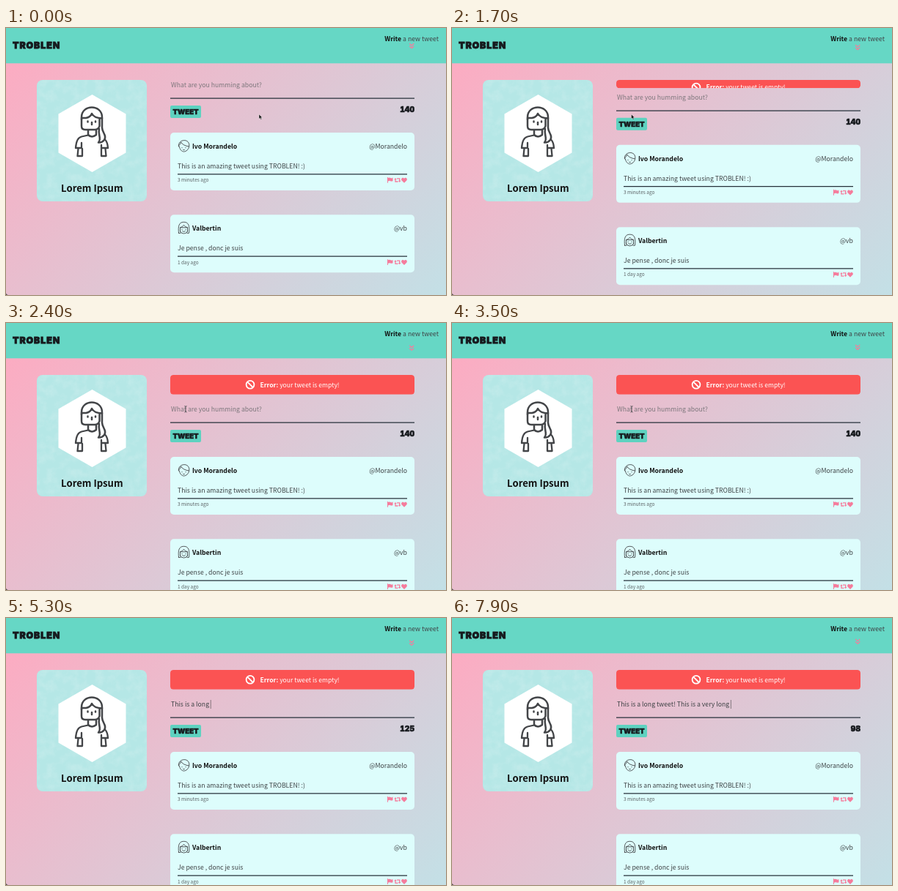
An HTML page for the animation above (8 s loop, 600x365 px).

```html
<!DOCTYPE html>
<html lang="en">
<head>
<meta charset="utf-8">
<title>Microblog</title>
<style>
  html, body { margin: 0; width: 100%; height: 100%; overflow: hidden; }
  body { background: linear-gradient(135deg, #ffa9c0, #c3e0e6); }
  svg { display: block; width: 600px; height: 365px; }
  text {
    font: 8.7px "Noto Sans CJK JP", "Noto Sans CJK SC", "Noto Sans CJK", "Open Sans", sans-serif;
    fill: #3f4346; white-space: pre;
  }
  .bold { font-weight: 700; fill: #111; }
  .end { text-anchor: end; }
  .title { font-size: 13.1px; text-anchor: middle; }
  .small { font-size: 6.5px; fill: #5a5f62; }
  .hint { fill: #7d777c; }
  .white { font-size: 8.6px; }
  .white, .white .bold { fill: #fff; }
  .display {
    font-family: Inter, "DejaVu Sans", sans-serif; font-weight: 900; fill: #16191d;
    stroke: #16191d; stroke-width: .5; font-variant-numeric: tabular-nums;
  }
  .logo { font-size: 12.4px; letter-spacing: .9px; stroke-width: .8; }
  .button { font-size: 9.5px; text-anchor: middle; }
  .counter { font-size: 10.2px; text-anchor: end; }
  .rule { stroke: #26303a; stroke-width: 1.3; }
  .pink { fill: #f57c9c; }
  .pinkline { fill: none; stroke: #f57c9c; stroke-width: 1.3; }
  .line { fill: none; stroke: #434548; stroke-linecap: round; stroke-linejoin: round; }
</style>
</head>
<body>
<svg viewBox="0 0 600 365">
  <defs>
    <filter id="paper" x="0" y="0" width="1" height="1">
      <feTurbulence type="fractalNoise" baseFrequency=".09" numOctaves="3" seed="4"/>
      <feColorMatrix values="0 0 0 0 .8  0 0 0 0 .92  0 0 0 0 .92  2.4 0 0 0 -.95"/>
      <feComposite in2="SourceGraphic" operator="in"/>
    </filter>
    <clipPath id="alertClip"><rect class="alertBox" x="224" y="71" width="333" height="0" rx="4"/></clipPath>
    <g id="actions">
      <path class="pink" d="M0 0h1v1q2-1 3.500 0t3-.4v4.400q-2 1-3.200 .2t-3.300 .2v2.400h-1z"/>
      <path class="pinkline" d="M11 2v4h3.600M13 1.800h3.700v4" stroke-width="1.100"/>
      <path class="pink" d="M9.200 3.200l1.800-2.300 1.800 2.300zM14.900 4.700h3.600l-1.800 2.300z"/>
      <path class="pink" d="M23 7.700l-3.300-3.300c-1.900-2.400 1.500-5.300 3.300-2.600 1.800-2.700 5.200 .2 3.300 2.600z"/>
    </g>
    <g id="boy" class="line" stroke-width=".9">
      <path d="M-7 1C-9-9 8-11 7.300 0C7 5 3 8 0 8S-5.500 5-6.200 1M-7 0Q-4.500-2-4-5Q-1 0 7 1"/>
      <path d="M-2.500 2.500v.3M2.500 2.500v.3M-1 5.500q1 .6 2 0"/>
    </g>
    <g id="girl" class="line" stroke-width=".9">
      <path d="M-7 7C-8-2-7-8 0-8S8-2 7 7Q5 8 4 6.500Q0 9-4 6.500Q-5 8-7 7zM-5 5V-.5Q-2-1 0-4Q2-1 5-.5V5M-5-.5H5"/>
      <path d="M-2.500 2v.4M2.500 2v.4M-1.800 4.500q1.800 1.500 3.600 0M-4 6.500L-5 4M4 6.500L5 4"/>
    </g>
  </defs>

  <rect width="600" height="48.300" fill="#66d7c5"/>
  <text class="display logo" x="9" y="28">TROBLEN</text>
  <text class="end" x="590" y="17.500"><tspan class="bold">Write</tspan> a new tweet</text>
  <path id="chevron" class="pinkline" stroke-linecap="round" d="M550.500-3l2.700 2.500 2.700-2.500M550.500 .6l2.700 2.500 2.700-2.500"/>

  <rect x="42" y="71" width="150" height="166" rx="8" fill="#b5e7e6"/>
  <rect x="42" y="71" width="150" height="166" rx="8" filter="url(#paper)" opacity=".22"/>
  <path d="M117.500 91L163.500 117.500V170.500L117.500 197L71.500 170.500V117.500z" fill="#fff"/>
  <g class="line" stroke-width="2.500">
    <path d="M103 125V122C103 104 131 104 131 122V136C131 143 138 147 134 153Q131 157 126 156.500C131 151 125 147 127 138"/>
    <path d="M103 123H109Q115 122 117 117Q120 123 131 123.500M103 124V134Q103 139 108 139H121Q126 139 127.500 134V124"/>
    <path d="M111.500 127.500v1M122 127.500v1M117 129v3M112 139.500V146Q117 151 123 146V140"/>
    <path d="M112 146.500L103 148.500Q96 150 95 164H103V157M98.500 165L97.500 175H104V165M130 160V175H136.500L135.500 165M135 152.500Q138.500 156 139 164H130" stroke-width="2.300"/>
  </g>
  <text class="bold title" x="117.300" y="224">Lorem Ipsum</text>

  <g clip-path="url(#alertClip)">
    <rect class="alertBox" x="224" y="71" width="333" height="0" rx="4" fill="#fb5353"/>
    <g id="alertText">
      <g fill="none" stroke="#fff" stroke-width="1.800"><circle cx="333" r="5.400"/><path d="M329.300-3.700L336.700 3.700"/></g>
      <text class="white" x="346.500" y="3.300"><tspan class="bold">Error:</tspan> your tweet is empty!</text>
    </g>
  </g>

  <g id="page">
    <text id="draft" x="225" y="81"></text>
    <path id="caret" d="M0 72V84" stroke="#444" stroke-width=".6"/>
    <path class="rule" d="M224 96.200H557"/>
    <rect x="224" y="106" width="42" height="17" rx="2" fill="#5ed2c0"/>
    <text class="display button" x="245" y="117.800">TWEET</text>
    <text id="counter" class="display counter" x="557" y="114.700">140</text>
    <g id="feed"></g>
  </g>

  <path id="arrow" d="M0 0V6.300L1.500 5L2.600 7.200L3.600 6.700L2.600 4.600H4.500z" fill="#111" stroke="#fff" stroke-width=".4"/>
  <path id="beam" class="line" d="M243.800 113.500Q245 113.500 245 114.500V121Q245 122 243.800 122M246.200 113.500Q245 113.500 245 114.500M245 121Q245 122 246.200 122" stroke-width=".8"/>
  <path d="M0 362.500Q.3 364.700 3 365H0z" fill="#444"/>
</svg>

<script>
const LOOP = 8000, STEP = 100;
const MESSAGE = 'This is a long tweet! This is a very long ';
const SLIDE = { start: 1520, length: 400, height: 26.7, shift: 40, padding: 5.8, line: 15 };

// Rows of [time, value]
const TYPED = [[3800, 0], [5300, 15], [6400, 23], [7900, 42]];
const POINTER = [[200, 345], [1300, 244.5]];
const BOUNCE = [[0, 0], [1700, 1.85], [2400, 2.5], [3500, 3.4], [5300, 5.5], [6400, 6.35], [7900, 8.35]];

const posts = [
  { y: 143, icon: 'boy', name: 'Ivo Morandelo', handle: '@Morandelo',
    text: 'This is an amazing tweet using TROBLEN! :)', age: '3 minutes ago' },
  { y: 255.3, icon: 'girl', name: 'Valbertin', handle: '@vb',
    text: 'Je pense , donc je suis', age: '1 day ago' }
];

const $ = id => document.getElementById(id);
const show = (id, on) => $(id).setAttribute('visibility', on ? 'visible' : 'hidden');
const move = (id, x, y) => $(id).setAttribute('transform', `translate(${x} ${y})`);

$('feed').innerHTML = posts.map(p => `
  <g transform="translate(224 ${p.y})">
    <rect width="333" height="79" rx="5" fill="#ddfdfc"/>
    <use href="#${p.icon}" x="18.5" y="18"/>
    <text class="bold" x="30" y="22">${p.name}</text>
    <text class="end" x="323" y="22">${p.handle}</text>
    <text x="10" y="49">${p.text}</text>
    <path class="rule" d="M10 56.800H323"/>
    <text class="small" x="10" y="67.300">${p.age}</text>
    <use href="#actions" x="296" y="61"/>
  </g>`).join('');

function lookup(rows, t) {
  if (t <= rows[0][0]) return rows[0][1];
  for (let i = 1; i < rows.length; i++) {
    const [t0, v0] = rows[i - 1], [t1, v1] = rows[i];
    if (t <= t1) return v0 + (v1 - v0) * (t - t0) / (t1 - t0);
  }
  return rows[rows.length - 1][1];
}

function drawAlert(t) {
  const u = Math.min(1, Math.max(0, (t - SLIDE.start) / SLIDE.length));
  const open = (1 - Math.cos(Math.PI * u)) / 2;
  document.querySelectorAll('.alertBox').forEach(box => box.setAttribute('height', SLIDE.height * open));
  move('alertText', 0, 71 + SLIDE.padding * open + SLIDE.line / 2);
  move('page', 0, SLIDE.shift * open);
  return open;
}

function drawDraft(t) {
  const count = Math.floor(lookup(TYPED, t) + 1e-6);
  const draft = $('draft');
  draft.textContent = count ? MESSAGE.slice(0, count) : 'What are you humming about?';
  draft.setAttribute('class', count ? '' : 'hint');
  show('caret', count > 0);
  if (count) move('caret', 225.2 + draft.getComputedTextLength(), 0);
  $('counter').textContent = 140 - count;
  return count;
}

function draw(t) {
  const open = drawAlert(t);
  const typing = drawDraft(t) > 0;
  move('chevron', 0, 29.3 - 4.8 * Math.cos(2 * Math.PI * lookup(BOUNCE, t)));
  move('arrow', lookup(POINTER, t), 118);
  show('arrow', open < .75);
  show('beam', open >= .75 && !typing);
}

const begin = performance.now();
function tick() {
  const t = (performance.now() - begin) % LOOP;
  draw(Math.floor(t / STEP) * STEP);
  requestAnimationFrame(tick);
}
tick();
</script>
</body>
</html>
```
